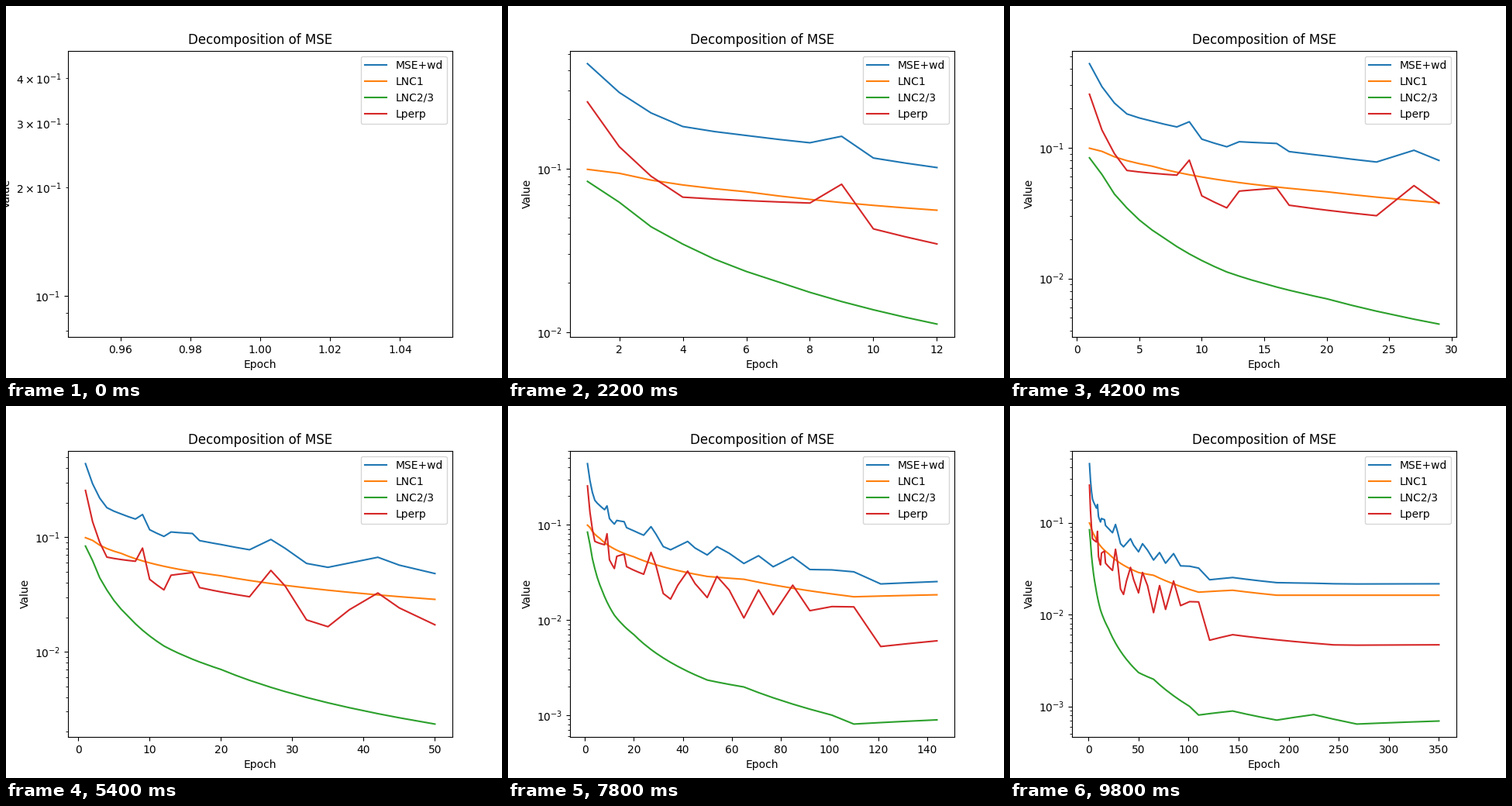
Write a matplotlib script that moves like this. It is 640 by 480 pixels and loops after 10 s.

```python
import matplotlib.pyplot as plt
import numpy as np
from matplotlib.animation import FuncAnimation

STEP_MS = 200
LAST = 350

# Whole epochs spaced evenly on a log scale
epochs = np.unique(np.round(LAST ** np.linspace(0, 1, 67)))


def trend(*points):
    """Decades below one, interpolated over log epoch through key points."""
    x, y = zip(*points)
    return np.interp(np.log(epochs), np.log(x), y)


def swing(first, last, peak, period, size):
    """Periodic ripple that acts between two epochs."""
    wave = size * np.cos(2 * np.pi * (epochs - peak) / period)
    return np.where((epochs > first) & (epochs < last), wave, 0)


lnc1 = 10 ** -trend(
    (1, 1.004), (2, 1.028), (6, 1.141), (20, 1.337), (50, 1.543),
    (65, 1.573), (110, 1.757), (144, 1.736), (188, 1.79), (LAST, 1.79))

lnc23 = 10 ** -trend(
    (1, 1.0775), (2, 1.205), (4, 1.461), (7, 1.692), (12, 1.95),
    (20, 2.155), (50, 2.632), (65, 2.705), (101, 3.001), (110, 3.095),
    (144, 3.051), (188, 3.15), (225, 3.09), (268, 3.193), (LAST, 3.16))

lperp_trend = trend(
    (1, 0.5915), (2, 0.865), (4, 1.174), (8, 1.21), (9, 1.095), (10, 1.368),
    (12, 1.46), (13, 1.332), (16, 1.309), (17, 1.44), (24, 1.52),
    (27, 1.44), (32, 1.64), (54, 1.63), (65, 1.86), (92, 1.76),
    (101, 1.86), (110, 1.863), (121, 2.28), (144, 2.22), (250, 2.335),
    (LAST, 2.33))
lperp = 10 ** -(lperp_trend + swing(24, 100, peak=34.3, period=14.6, size=0.15))

curves = {"MSE+wd": lnc1 + lnc23 + lperp,
          "LNC1": lnc1, "LNC2/3": lnc23, "Lperp": lperp}

fig, ax = plt.subplots(figsize=(6.4, 4.8), dpi=100)
ax.set_yscale("log")
ax.set_title("Decomposition of MSE")
ax.set_xlabel("Epoch")
ax.set_ylabel("Value")
lines = [ax.plot(epochs[:1], y[:1], label=name)[0]
         for name, y in curves.items()]
ax.legend(loc="upper right")


def draw(i):
    for line, y in zip(lines, curves.values()):
        line.set_data(epochs[:i + 1], y[:i + 1])
    ax.relim()
    ax.autoscale_view()
    return lines


anim = FuncAnimation(fig, draw, frames=len(epochs), init_func=lambda: draw(0),
                     interval=STEP_MS, repeat=True, repeat_delay=0)
plt.show()
```
